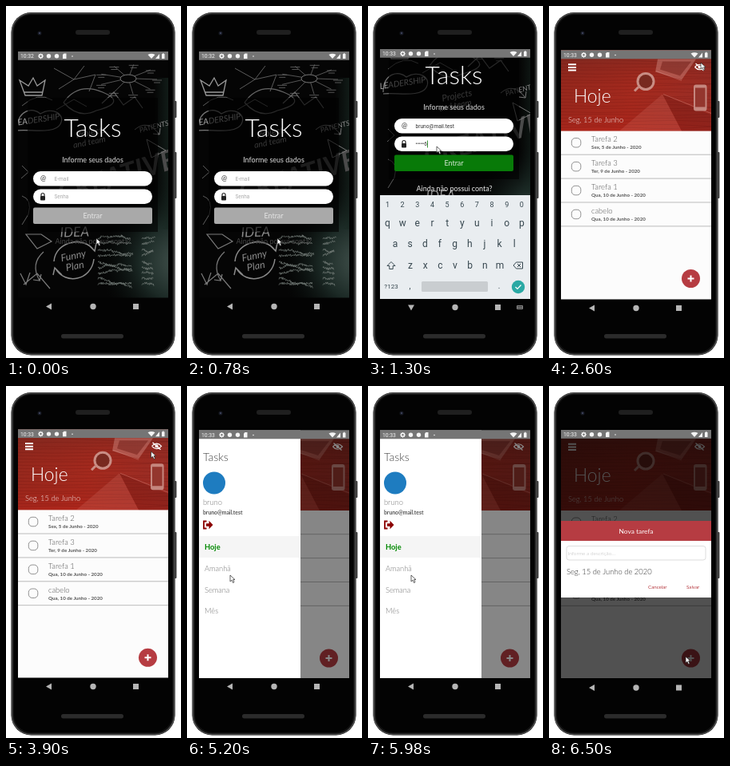
An HTML page with a canvas for the animation above (7.8 s loop, 219x441 px).

```html
<!DOCTYPE html>
<html lang="pt">
<head>
<meta charset="utf-8">
<title>Tasks</title>
<style>
html, body { margin: 0; width: 100%; height: 100%; overflow: hidden; background: #fff; }
canvas { display: block; width: 219px; height: 441px; }
</style>
</head>
<body>
<canvas id="stage"></canvas>
<script>
const W = 219, H = 441, HOLD = 1300;
const RED = '#b63c42';
const canvas = document.getElementById('stage');
const c = canvas.getContext('2d');
const ratio = window.devicePixelRatio || 1;
canvas.width = W * ratio;
canvas.height = H * ratio;

function text(s, x, y, size, color, weight = 400, align = 'left', family = 'Lato') {
  c.font = `${weight} ${size}px ${family}, sans-serif`;
  c.textAlign = align;
  c.fillStyle = color;
  c.fillText(s, x, y);
}
function box(x, y, w, h, color, r = 0) {
  c.fillStyle = color;
  c.beginPath();
  c.roundRect(x, y, w, h, r);
  c.fill();
}
function outline(x, y, w, h, color, r, width = .8) {
  c.strokeStyle = color;
  c.lineWidth = width;
  c.beginPath();
  c.roundRect(x, y, w, h, r);
  c.stroke();
}
function disc(x, y, r, color) {
  c.fillStyle = color;
  c.beginPath();
  c.arc(x, y, r, 0, 7);
  c.fill();
}
function ring(x, y, r, color, width = 1, ry = r) {
  c.strokeStyle = color;
  c.lineWidth = width;
  c.beginPath();
  c.ellipse(x, y, r, ry, 0, 0, 7);
  c.stroke();
}
function stroke(d, color, width = 1) {
  c.strokeStyle = color;
  c.lineWidth = width;
  c.stroke(new Path2D(d));
}
function shape(d, color) {
  c.fillStyle = color;
  c.fill(new Path2D(d));
}
function at(x, y, draw, angle = 0) {
  c.save();
  c.translate(x, y);
  c.rotate(angle);
  draw();
  c.restore();
}
function blend(g, colors) {
  colors.forEach((color, i) => g.addColorStop(i / (colors.length - 1), color));
  return g;
}
const linear = (x0, y0, x1, y1, ...colors) => blend(c.createLinearGradient(x0, y0, x1, y1), colors);
const radial = (x, y, r, ...colors) => blend(c.createRadialGradient(x, y, 0, x, y, r), colors);
function random(seed) {
  return () => (seed = seed * 16807 % 2147483647) / 2147483647;
}

function phone() {
  box(209, 119, 4.5, 21, '#444', 1);
  box(209, 183, 4.5, 58, '#444', 1);
  box(6.5, 8, 205, 429.5, '#111', 25);
  outline(7.5, 9, 203, 427.5, '#4c4c4c', 24, 1.6);
  box(10, 11, 198, 423, '#030303', 22);
  box(87, 30, 43, 6, '#1f1f1f', 3);
  disc(42, 34, 2.6, '#15171f');
  disc(42, 34, 1.2, '#3b4058');
  box(69, 411, 78, 5.5, '#2b2b2b', 2.7);
}

function navigation(y, keyboard) {
  const color = '#b5b5b5';
  at(54, y, () => shape('M-4 0L3 -4V4Z', color), keyboard ? -Math.PI / 2 : 0);
  disc(109, y, 3.7, color);
  box(159, y - 3.5, 7, 7, color);
  if (keyboard) {
    box(186, y - 2.5, 8, 5, '#888', 1);
    stroke(`M187 ${y - 1}h6M187 ${y + 1}h6`, '#000', .6);
  }
}

function status(y, time) {
  const ink = '#f4f4f4';
  box(15, y, 188, 10.7, '#757575');
  text(time, 18, y + 8.2, 6.8, ink, 400, 'left', 'Roboto');
  ring(43.5, y + 5.8, 2, ink, 1.5);
  for (let i = 0; i < 8; i++) at(43.5, y + 5.8, () => box(-.5, -3.4, 1, 1.2, ink), i * Math.PI / 4);
  disc(53.5, y + 5.8, 2.7, ink);
  disc(63.5, y + 5.8, 2.7, ink);
  shape(`M71 ${y + 4}l1.5 -1.5h3v6.5h-4.5Z`, ink);
  disc(83, y + 6, .8, ink);
  shape(`M177.5 ${y + 4}Q182 ${y + 1.5} 186.5 ${y + 4}L182 ${y + 9}Z`, ink);
  shape(`M187 ${y + 9}h5v-6Z`, ink);
  box(195, y + 3, 3.5, 6, ink, .5);
  box(196, y + 2.2, 1.5, 1, ink);
}

function cursor(x, y) {
  at(x, y, () => {
    const d = 'M0 0V8L2 6.2L3.5 9.5L5 8.8L3.6 5.6H6Z';
    shape(d, '#fff');
    stroke(d, '#222', .7);
  });
}

// Login
function chalk(s, x, y, size, angle, color = '#8a8a8a', weight = 400) {
  at(x, y, () => text(s, 0, 0, size, color, `italic ${weight}`, 'center'), angle);
}
function scribble(x, y, width, rnd) {
  let d = `M${x} ${y}`;
  for (let i = 0; i < width; i++) d += `l${.5 + rnd()} ${(i % 2 ? 1 : -1) * (1 + rnd() * 2)}`;
  stroke(d, '#77807c', .7);
}
function chalkboard() {
  const dim = '#5c5c5c';
  box(10, 40, 200, 340, '#050505');
  box(10, 40, 200, 340, radial(218, 320, 100, '#43534e', '#1c2a26', 'rgba(8,14,12,0)'));
  box(185, 90, 20, 190, linear(185, 0, 205, 0, 'rgba(24,40,34,0)', 'rgba(24,40,34,.7)'));
  stroke('M24 112L17 93L28 100L34 90L39 100L49 93L45 112ZM23 108h23', '#999', 1.3);
  stroke('M14 154C14 130 34 126 43 135C58 126 75 135 68 148C61 161 30 154 14 156', '#777', 1.2);
  chalk('LEADERSHIP', 39, 146, 10.5, -.15, '#aaa');
  chalk('Projects', 107, 162, 11.5, -.2);
  chalk('and team', 105, 174, 10.5, -.2);
  chalk('PATIENTS', 186, 154, 9, -.25);
  stroke('M60 78L85 92L66 104M85 92L112 86L104 107M85 92L98 75M20 125q20 -18 38 -7M63 130l22 -13l16 9', dim);
  stroke('M72 121q18 -26 49 -13t-8 23q-22 11 -41 -10M120 122l15 -14l12 16l14 -10l10 14', '#666', 1.2);
  ring(153, 91, 10, '#777', 1, 5);
  for (let i = 0; i < 9; i++) {
    const a = i * .7, x = 153 + 36 * Math.cos(a), y = 92 + 19 * Math.sin(a);
    stroke(`M${153 + 10 * Math.cos(a)} ${91 + 5 * Math.sin(a)}L${x} ${y}m-6 1h12m-10 3h8`, '#6a6a6a', .8);
  }
  chalk('CREATIVE', 142, 225, 35, -.3, '#4a4a4a', 700);
  stroke('M161 155q16 -14 31 6l-8 -1m8 1l1 -8M176 167l24 14l-18 9Z', '#777');
  stroke('M20 200l8 8l-9 8M20 238q13 4 8 23l-8 13', dim);
  chalk('IDEA', 86, 289, 17, -.03);
  stroke('M60 320C62 294 98 288 110 306M110 317C107 344 74 350 62 329M104 300l7 7l2 -10M70 337l-9 -9l-2 9', '#8a8a8a', 1.5);
  chalk('Funny', 85, 317, 12.5, -.2);
  chalk('Plan', 87, 330, 12.5, -.2);
  stroke('M47 308q-17 15 -5 36l-8 -1m8 1l2 -8M57 295l-13 -9h-19l14 18ZM22 349l17 -14l16 19M18 335l7 14l5 -15', '#7b7b7b', 1.2);
  const rnd = random(31);
  for (let row = 0; row < 9; row++) {
    scribble(115, 292 + row * 7.2, 42, rnd);
    scribble(170, 292 + row * 7.2, 14, rnd);
  }
}
function field(x, y, icon, label, size, color) {
  box(x, y, 149, 18.5, '#fff', 9.3);
  if (icon === '@') text('@', x + 12.5, y + 12.3, 8.5, '#333', 400, 'center');
  else {
    box(x + 9, y + 8.5, 6, 5.5, '#222', 1);
    stroke(`M${x + 10} ${y + 9}v-2a2 2 0 0 1 4 0v2`, '#222', 1.2);
  }
  text(label, x + 26.5, y + 11.7, size, color, 400, 'left', 'Roboto');
}
function loginForm(x, y, filled) {
  box(x - 7, y - 92, 163, 168, 'rgba(0,0,0,.6)');
  text('Tasks', x + 74.5, y - 43.5, 31.7, '#fff', 300, 'center');
  text('Informe seus dados', x + 74.5, y - 11.5, 9, '#ddd', 400, 'center');
  field(x, y, '@', filled ? 'bruno@mail.test' : 'E-mail', 6.6, filled ? '#333' : '#aaa');
  field(x, y + 22.5, 'lock', filled ? '•••••6' : 'Senha', 6.4, filled ? '#333' : '#aaa');
  box(x, y + 45.5, 149, 20.5, filled ? '#087a08' : '#a9a9a9', 2);
  text('Entrar', x + 74.5, y + 59.3, 9, filled ? '#d5e8d5' : '#e4e4e4', 400, 'center');
  text('Ainda não possui conta?', x + 75, y + 90.5, 9, filled ? '#eee' : '#444', 400, 'center');
}
function login() {
  chalkboard();
  loginForm(34, 207, false);
  status(57, '10:32');
  cursor(113, 291);
}

function keys(letters, x, y, size, pitch = 18.65) {
  [...letters].forEach((k, i) => text(k, x + i * pitch, y, size, '#37474f', 400, 'center', 'Roboto'));
}
function typing() {
  at(5, -46, chalkboard);
  loginForm(33, 141, true);
  status(54, '10:33');
  stroke('M74.5 168.5v9', '#087a08', .8);
  cursor(86, 176);
  box(15, 237, 188, 130, '#e9edf0');
  keys('1234567890', 24.5, 251.5, 9);
  keys('qwertyuiop', 24.5, 276, 12);
  keys('asdfghjkl', 34, 302, 12);
  keys('zxcvbnm', 53, 328.5, 12);
  stroke('M29 320.5l-5 5h2.8v4h4.4v-4h2.8Z', '#37474f');
  stroke('M182 325l3.5 -4h8v8h-8ZM187 323l4 4m0 -4l-4 4', '#37474f');
  text('?123', 29, 354, 8, '#37474f', 400, 'center', 'Roboto');
  keys(',.', 52.5, 354, 10, 111.5);
  box(67, 345, 83, 13, '#c9cdd0', 1.5);
  disc(188, 352, 8.2, '#2aa9a4');
  stroke('M184.5 352l2.5 2.5l4.5 -5', '#fff', 1.2);
}

// Task list
function header() {
  box(15, 55, 188, 101, linear(15, 66, 203, 150, '#94281d', '#a52a1e', '#962e27'));
  box(15, 55, 188, 101, linear(0, 66, 0, 156, 'rgba(90,40,35,.3)', 'rgba(150,25,15,0)', 'rgba(190,35,25,.4)'));
  const rnd = random(7);
  for (let y = 68; y < 156; y += 4) {
    stroke(`M15 ${y}q47 ${rnd() * 6 - 3} 94 0t94 ${rnd() * 6 - 3}`, 'rgba(70,10,5,.14)');
  }
  shape('M136 66H184L166 92L133 82Z', 'rgba(225,170,160,.35)');
  shape('M142 69H178L164 87L139 79Z', 'rgba(105,20,15,.45)');
  shape('M88 156L142 110L166 156Z', 'rgba(235,150,135,.16)');
  shape('M142 110L203 136V156H166Z', 'rgba(90,15,10,.25)');
  stroke('M134 81l32 12M143 110l60 24', 'rgba(255,200,190,.25)');
  stroke('M112 101l-5 5', '#c98d84', 3);
  disc(121, 94, 11.5, '#c98d84');
  disc(121, 94, 8.5, '#782a20');
  box(181, 98, 16.5, 33, '#c5867e', 3);
  box(183, 102, 12.5, 24, '#94362e');
}
function headerText() {
  stroke('M24 72.8h10M24 76.4h10M24 80h10', '#fff', 2);
  stroke('M182.5 76q6 -6.5 12 0q-6 6.5 -12 0M183.5 71.5l10 9', '#fff', 1.2);
  disc(188.5, 76, 2, '#fff');
  text('Hoje', 31, 120, 22.8, '#fff', 300);
  text('Seg, 15 de Junho', 24, 145, 9.3, '#f6e4e2', 300);
}
const TASKS = [
  ['Tarefa 2', 'Sex, 5 de Junho - 2020'],
  ['Tarefa 3', 'Ter, 9 de Junho - 2020'],
  ['Tarefa 1', 'Qua, 10 de Junho - 2020'],
  ['cabelo', 'Qua, 10 de Junho - 2020'],
];
function list() {
  box(15, 55, 188, 314, '#fcfcfc');
  header();
  headerText();
  status(55, '10:33');
  TASKS.forEach(([name, date], i) => {
    const y = 156 + i * 29.9;
    outline(28.3, y + 9, 11.5, 11.5, '#777', 4.5);
    text(name, 53, y + 13.8, 9.5, '#555', 300);
    text(date, 53, y + 22.8, 6.2, '#555', 700);
    stroke(`M15 ${y + 29.7}h188`, '#aaa', .8);
  });
  disc(177.5, 341, 11.5, RED);
  stroke('M173.5 341h8m-4 -4v8', '#fff', 2);
}

function drawer() {
  list();
  box(142, 55, 61, 312, 'rgba(0,0,0,.47)');
  box(15, 66, 127, 301, '#fff');
  status(55.5, '10:33');
  text('Tasks', 20, 94, 14, '#444', 300);
  disc(34, 121.5, 14, '#1e7cc0');
  text('bruno', 20, 149, 9.3, '#777', 300);
  text('bruno@mail.test', 20, 161, 6.8, '#555', 700);
  stroke('M24.5 169.5h-3.5v9h3.5', '#8b0000', 1.8);
  shape('M24 172.2h3.5v-3.5l5 5.3l-5 5.3v-3.5h-3.5Z', '#8b0000');
  box(15, 188, 127, 27, '#f5f5f5');
  text('Hoje', 22, 205, 9.3, '#080', 700);
  ['Amanhã', 'Semana', 'Mês'].forEach((s, i) => text(s, 22, 232 + i * 26.7, 9.3, '#777', 300));
  cursor(54, 237);
}

function dialog() {
  list();
  box(15, 55, 188, 312, 'rgba(0,0,0,.68)');
  status(55, '10:33');
  box(15, 169, 188, 96, '#fff');
  box(15, 169, 188, 25, RED);
  text('Nova tarefa', 109, 184.5, 8.4, '#fff', 400, 'center');
  outline(22, 200.5, 174, 17.5, '#d5d5d5', 3);
  text('Informe a descrição...', 23.5, 211.5, 6.5, '#b5b5b5', 300);
  text('Seg, 15 de Junho de 2020', 22, 235.5, 9.4, '#333', 300);
  text('Cancelar', 124, 254, 6.2, RED, 400);
  text('Salvar', 172, 254, 6.2, RED, 400);
  cursor(171, 339);
}

const SCENES = [
  { draw: login, bottom: 365.5, nav: 376.5 },
  { draw: typing, bottom: 367, nav: 377.5, keyboard: true },
  { draw() { at(0, .5, list); cursor(190, 71); }, bottom: 367.5, nav: 378.5 },
  { draw() { at(0, -.7, list); cursor(181.5, 82); }, bottom: 365.5, nav: 376.5 },
  { draw: drawer, bottom: 366, nav: 376.5 },
  { draw: dialog, bottom: 365.5, nav: 378 },
];

function render(now) {
  const scene = SCENES[Math.floor(now / HOLD) % SCENES.length];
  c.setTransform(ratio, 0, 0, ratio, 0, 0);
  c.fillStyle = '#fff';
  c.fillRect(0, 0, W, H);
  phone();
  navigation(scene.nav, scene.keyboard);
  c.save();
  c.beginPath();
  c.rect(15, 54, 188, scene.bottom - 54);
  c.clip();
  scene.draw();
  c.restore();
  requestAnimationFrame(render);
}
requestAnimationFrame(render);
</script>
</body>
</html>
```
